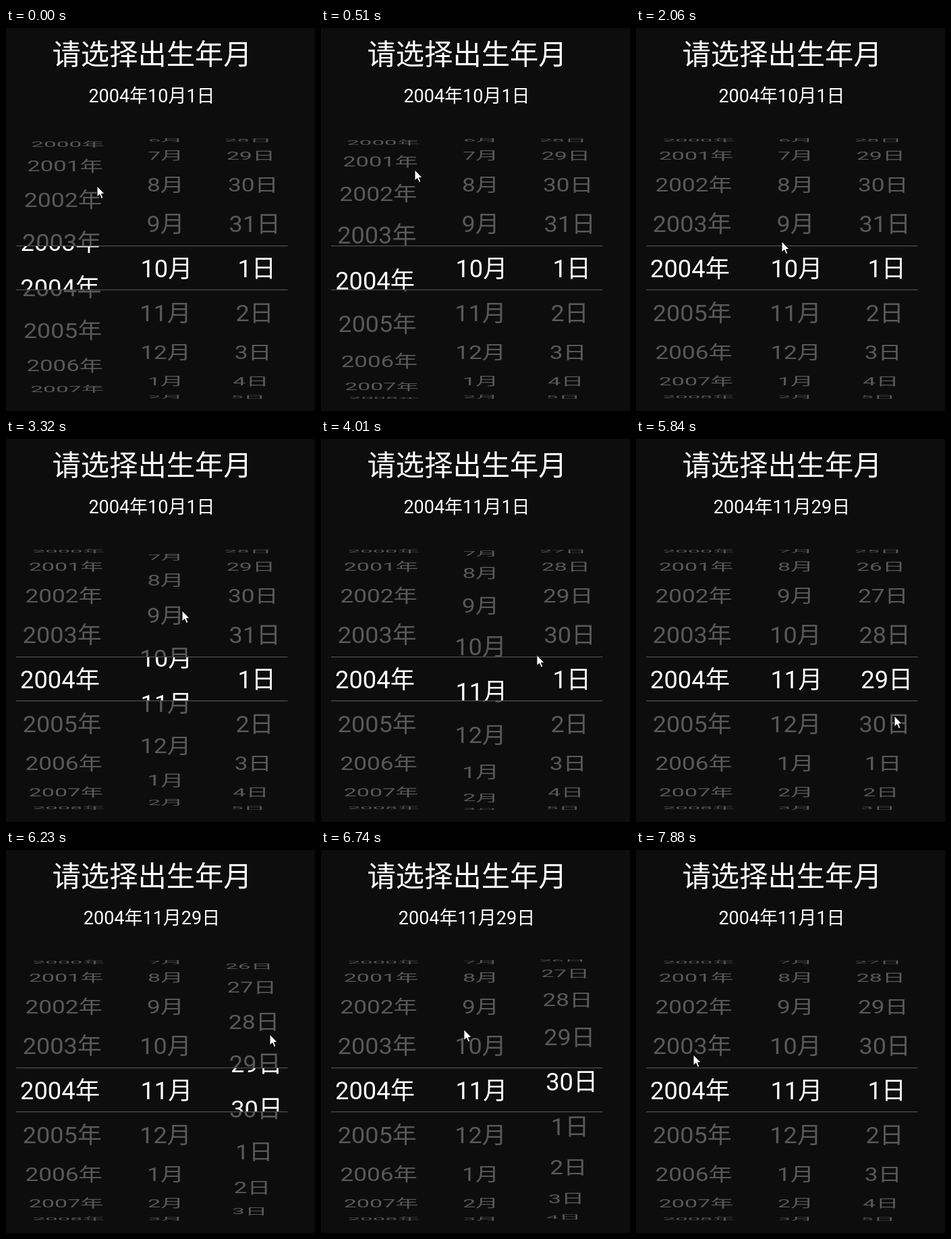
Animation of 458x567 px, one loop 8000 ms. Source, as an HTML page with a canvas:

```html
<!DOCTYPE html>
<html lang="zh-CN">
<head>
<meta charset="utf-8">
<title>请选择出生年月</title>
<style>
html, body { margin: 0; width: 100%; height: 100%; overflow: hidden; background: #0d0d0d; }
canvas { display: block; }
</style>
</head>
<body>
<canvas id="stage" width="458" height="567"></canvas>
<script>
const ctx = document.getElementById('stage').getContext('2d');
const LOOP = 8000, TICK = 135, RESUME = 2060;
const FONT = 'Roboto, "Noto Sans CJK SC", "Noto Sans CJK", sans-serif';
const MID = 355.5, RADIUS = 193, STEP = Math.PI / 9, DEPTH = 1500;
const TOP = 162, BOTTOM = 549, LINE1 = 322.6, LINE2 = 387.6;

// Stops of the pointer: time, x, y
const stops = [
  [0, 135, 234], [525, 139, 210], [1470, 121, 295], [2060, 216, 316], [3275, 261, 254],
  [5300, 367, 372], [5840, 383, 410], [6245, 391, 273], [7325, 97, 261], [7865, 85, 303]
];

// Wheels: centre x of dim and bright text, and the vanishing x
const wheels = [
  { dim: 82.4, lit: 80, pivot: 193, label: n => n + '年' },
  { dim: 236.6, lit: 238, pivot: 236, label: n => wrap(n, 12) + '月' },
  { dim: 369.6, lit: 371.8, pivot: 258, label: (n, days) => wrap(n, days) + '日' }
];

const wrap = (n, size) => ((n - 1) % size + size) % size + 1;
const part = (t, start, end) => Math.min(1, Math.max(0, (t - start) / (end - start)));

// Holds each picture for one tick; the rhythm restarts after the pause
function snap(t) {
  const start = t < RESUME ? 120 : RESUME;
  return Math.max(0, start + Math.floor((t - start) / TICK + 0.2) * TICK);
}

function pointer(t) {
  const i = Math.max(1, stops.findIndex(s => s[0] > t));
  if (t >= stops.at(-1)[0]) return stops.at(-1).slice(1);
  // rests between the last stop before the pause and the restart
  const [a, b] = [stops[i - 1], stops[i]];
  const p = b[0] === RESUME ? 0 : part(t, a[0], b[0]);
  const ease = p * (2 - p);
  return [1, 2].map(k => a[k] + (b[k] - a[k]) * ease);
}

function text(str, x, y, size, color) {
  ctx.font = size + 'px ' + FONT;
  ctx.fillStyle = color;
  ctx.fillText(str, x, y);
}

function drawWheel(wheel, pos, days, lit) {
  const near = Math.round(pos);
  for (let n = near - 5; n <= near + 5; n++) {
    const angle = (n - pos) * STEP, flat = Math.cos(angle);
    if (flat <= 0.04) continue;
    const scale = DEPTH / (DEPTH + RADIUS * (1 - flat));
    ctx.save();
    ctx.translate(wheel.pivot, MID + RADIUS * Math.sin(angle));
    ctx.scale(scale, scale * flat);
    text(wheel.label(n, days), (lit ? wheel.lit : wheel.dim) - wheel.pivot, 13.6, 36.3,
      lit ? '#fff' : '#595959');
    ctx.restore();
  }
}

// Clips drawing to horizontal bands given as [top, bottom]
function inBands(bands, draw) {
  ctx.save();
  ctx.beginPath();
  for (const [a, b] of bands) ctx.rect(0, a, 458, b - a);
  ctx.clip();
  draw();
  ctx.restore();
}

function drawPointer(x, y) {
  const shape = new Path2D('M0 0V16L3.8 12.6L6.4 18.6L9 17.5L6.5 11.7H11.3Z');
  ctx.save();
  ctx.translate(x, y);
  ctx.strokeStyle = '#000';
  ctx.fillStyle = '#fff';
  ctx.fill(shape);
  ctx.stroke(shape);
  ctx.restore();
}

function render(t) {
  const year = 2003.585 + 0.415 * part(t, 0, 1065) ** 1.4;
  const monthPos = 10 + part(t, 2060, 4650);
  const month = Math.round(monthPos);
  const days = month === 10 ? 31 : 30;
  // the day wheel rolls back two days, then forward again
  const dayPos = 31 - 2 * part(t, 5300, 5840) + 2 * part(t, 5840, 7190);
  const day = t >= 5840 && t < 7190 ? 29 : 1;
  const places = [year, monthPos, t < 5300 ? 1 : dayPos];
  const drawAll = lit => wheels.forEach((w, i) => drawWheel(w, places[i], days, lit));

  ctx.fillStyle = '#0d0d0d';
  ctx.fillRect(0, 0, 458, 567);
  ctx.textAlign = 'center';
  text('请选择出生年月', 216.6, 53.8, 42.3, '#fff');
  text(`2004年${month}月${day}日`, 216, 109.6, 27, '#fff');

  inBands([[TOP, LINE1], [LINE2, BOTTOM]], () => drawAll(false));
  inBands([[LINE1, LINE2]], () => drawAll(true));

  ctx.fillStyle = '#505050';
  for (const y of [LINE1, LINE2]) ctx.fillRect(15, y - 0.6, 402.5, 1.2);
  drawPointer(...pointer(t));
}

function frame() {
  render(snap(performance.now() % LOOP));
  requestAnimationFrame(frame);
}
frame();
</script>
</body>
</html>
```
